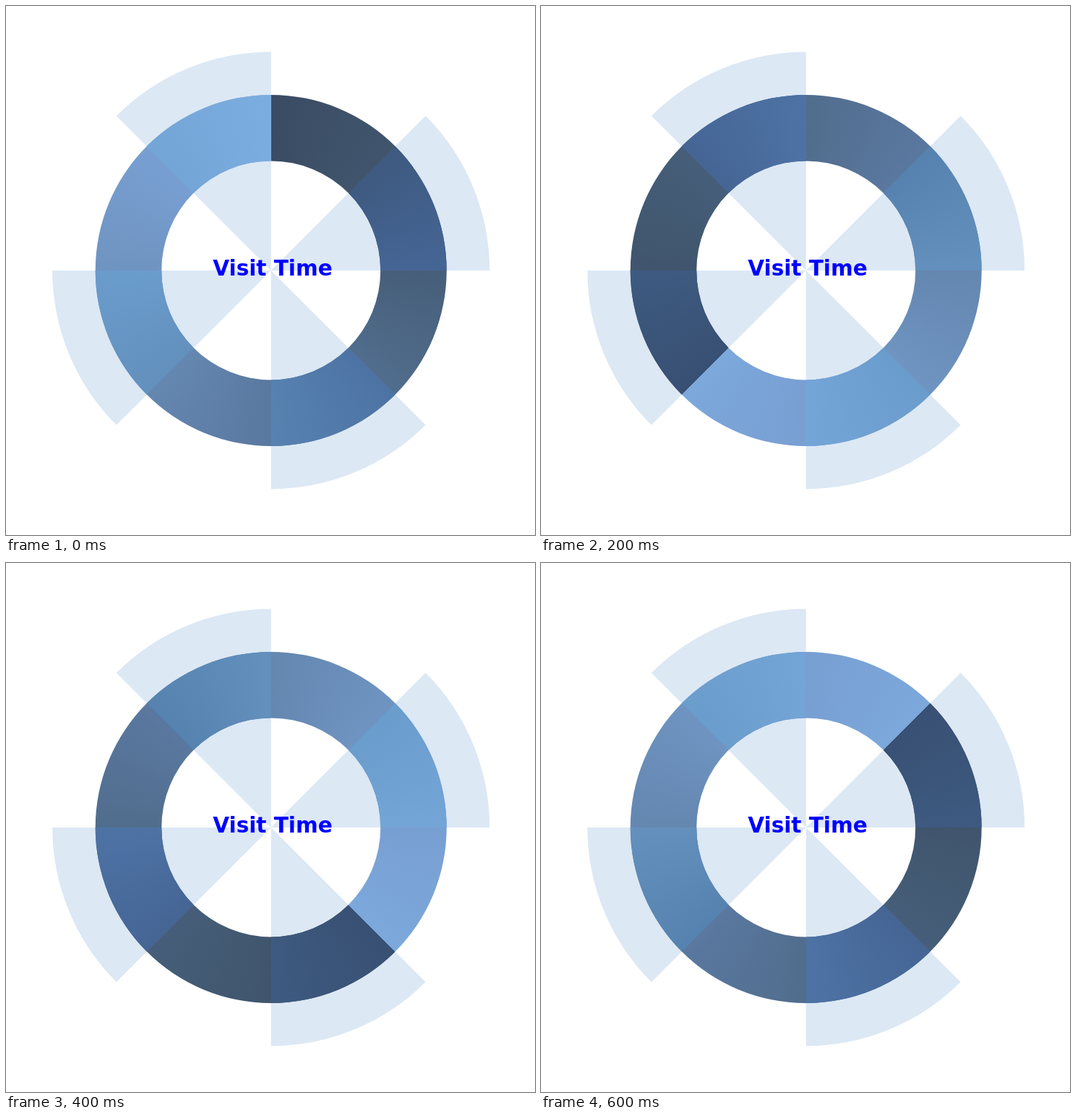
An HTML page with a canvas for the animation above (0.7 s loop, 732 by 732 pixels).

```html
<!DOCTYPE html>
<html lang="en">
<head>
<meta charset="utf-8">
<title>Visit Time</title>
<style>
html, body { margin: 0; width: 100%; height: 100%; overflow: hidden; background: #fff; }
canvas { display: block; }
</style>
</head>
<body>
<canvas id="stage" width="732" height="732"></canvas>
<script>
const ctx = document.getElementById('stage').getContext('2d');
const CX = 366.7, CY = 365.9;
const FAN = 302.5, OUTER = 243, INNER = 151.5;
const STEP = 100, STEPS = 7, EIGHTH = Math.PI / 4;

// Ring colours at every eighth of a turn, clockwise from the seam
const PLAIN = ['#3a4c63', '#40556d', '#465e79', '#516d8d', '#5a78a0',
  '#6487b0', '#6f94c1', '#789fd2', '#7ca8dc'];
const TINTED = ['#385073', '#3e5a80', '#456595', '#4d73a4', '#5682b0',
  '#6390bd', '#6a9ccc', '#74a5d7', '#7cade0'];

const fan = new Path2D();
for (let k = 0; k < 4; k++) {
  const start = EIGHTH * (2 * k + 1);
  fan.moveTo(CX, CY);
  fan.arc(CX, CY, FAN, start, start + EIGHTH);
  fan.closePath();
}

const ring = new Path2D();
for (const radius of [OUTER, INNER]) {
  ring.moveTo(CX + radius, CY);
  ring.arc(CX, CY, radius, 0, 2 * Math.PI);
}

function fillRing(colors, seam) {
  const gradient = ctx.createConicGradient(seam, CX, CY);
  colors.forEach((color, i) => gradient.addColorStop(i / 8, color));
  ctx.fillStyle = gradient;
  ctx.fill(ring, 'evenodd');
}

function draw(time) {
  const step = Math.floor(time / STEP) % STEPS;
  // Counter-clockwise by eighths; the first move covers two
  const turn = step ? step + 1 : 0;
  const seam = -EIGHTH * (2 + turn);

  ctx.fillStyle = '#fff';
  ctx.fillRect(0, 0, 732, 732);
  ctx.fillStyle = '#dce8f4';
  ctx.fill(fan);

  fillRing(PLAIN, seam);
  ctx.save();
  ctx.clip(fan);
  fillRing(TINTED, seam);
  ctx.restore();

  ctx.fillStyle = '#00f';
  ctx.font = 'bold 29.5px "DejaVu Sans", sans-serif';
  ctx.textAlign = 'center';
  ctx.fillText('Visit Time', 369, 373);
}

function tick() {
  draw(performance.now());
  requestAnimationFrame(tick);
}
tick();
</script>
</body>
</html>
```
